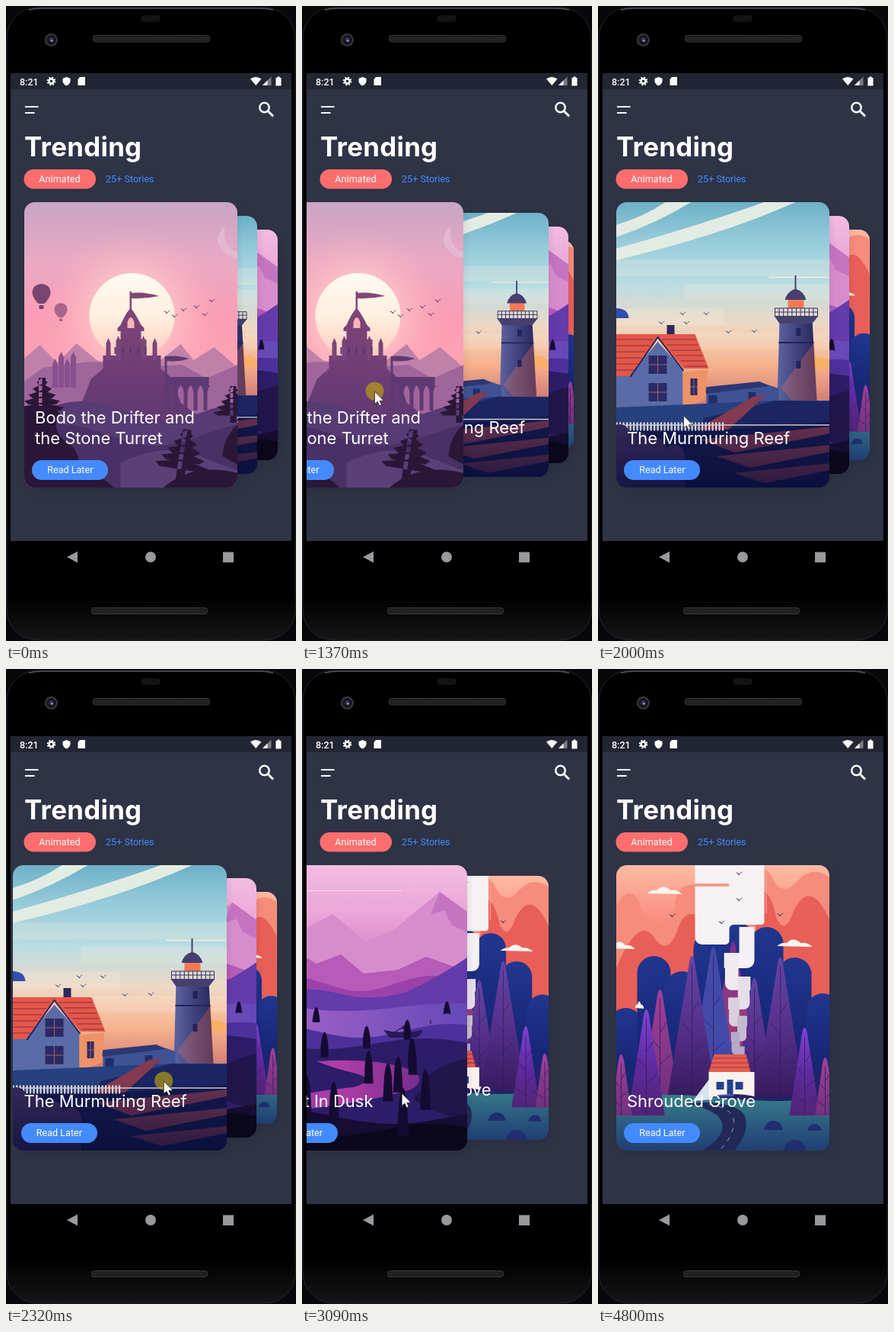
Animation of 381 by 832 pixels, one loop 5350 ms. Source, as an HTML page:

```html
<!DOCTYPE html>
<html lang="en">
<head>
<meta charset="utf-8">
<title>Trending stories</title>
<style>
html, body { margin: 0; width: 100%; height: 100%; overflow: hidden; background: #08080b; }
#stage { position: relative; width: 381px; height: 832px; overflow: hidden; }
#stage > svg { position: absolute; inset: 0; }
#deck { position: absolute; left: 6px; top: 88px; width: 369px; height: 613px; overflow: hidden; }
.card, .shade { position: absolute; overflow: hidden; border-radius: 14px; }
.shade { box-shadow: 3px 5px 9px rgba(0,0,0,.07); }
.card svg { display: block; width: 100%; height: 100%; }
.card p { position: absolute; left: 14.5px; bottom: 51.5px; margin: 0; color: #fff; white-space: pre; font: 22px/27px Inter, sans-serif; }
.card b { position: absolute; left: 10.8px; bottom: 10.5px; width: 100px; border-radius: 13px; background: #448aff; color: #fff; text-align: center; font: 12.6px/25.5px Roboto, sans-serif; }
</style>
</head>
<body>
<div id="stage">
  <svg width="381" height="832">
    <linearGradient id="chin" x2="0" y2="1"><stop offset=".93"/><stop offset="1" stop-color="#161618"/></linearGradient>
    <rect x="1" y="2" width="379" height="829" rx="40" fill="url(#chin)" stroke="#25262b"/>
    <path d="M30 5Q38 3 48 3H333Q343 3 351 5" fill="none" stroke="#55565a" stroke-width="1.5"/>
    <rect x="177" y="12" width="26" height="9" rx="4.5" fill="#131314"/>
    <g fill="#1d1d1f" stroke="#39393c">
      <rect x="114.5" y="38.5" width="153" height="8.5" rx="3"/>
      <rect x="112.5" y="788.5" width="152" height="8" rx="3"/>
    </g>
    <path d="M118 43H264M116 792.5H261" stroke="#2c2c2e" stroke-width="4" stroke-dasharray="1 1.5"/>
    <circle cx="59.5" cy="44.5" r="7.5" fill="#15151b" stroke="#3a3a3d" stroke-width="2"/>
    <circle cx="59.5" cy="44" r="3" fill="#30356a"/><circle cx="60.5" cy="45.5" r="1.2" fill="#a8acd0"/>
    <rect x="6" y="88" width="369" height="613" fill="#2e3346"/>
    <rect x="6" y="88" width="369" height="21" fill="#222633"/>
    <g fill="#fff" font-family="Roboto, sans-serif">
      <text x="18" y="103.5" font-size="12.5" font-weight="500">8:21</text>
      <circle cx="59.5" cy="98.5" r="3" fill="none" stroke="#fff" stroke-width="2.6"/>
      <circle cx="59.5" cy="98.5" r="4.8" fill="none" stroke="#fff" stroke-width="2" stroke-dasharray="2 1.77"/>
      <path d="M79.5 93l5 2v3.5q-.5 4-5 6-4.5-2-5-6V95zM97 93h7v11H94.5V96zM321 95.5q7-5 14.5 0L328.3 104zM354.5 94H356.5V92.5H359.5V94H361.5V104.5H354.5z"/>
      <path d="M337 104L348.5 92.5V104z" opacity=".4"/><path d="M337 104L343.5 97.5V104z"/>
      <path d="M25 132H42.5M25 140H37.5" stroke="#fff" stroke-width="2"/>
      <g fill="none" stroke="#fff" stroke-width="2.5"><circle cx="339.5" cy="133" r="6.2"/><path d="M344 137.5L351 144.5" stroke-width="3"/></g>
      <text x="24" y="197" font-family="Inter, sans-serif" font-size="34.8" font-weight="700" letter-spacing=".3">Trending</text>
      <rect x="23.5" y="214" width="94.5" height="25.5" rx="12.7" fill="#ff6e6e"/>
      <text x="70.5" y="231.3" font-size="12.7" text-anchor="middle">Animated</text>
      <text x="131" y="231.3" font-size="12.6" fill="#448aff">25+ Stories</text>
    </g>
    <path d="M80 722L94 714.5V729.5zM285 715.5H299V729H285zM197 722a7 7 0 1 1-14 0a7 7 0 1 1 14 0" fill="#98989d"/>
  </svg>
  <div id="deck"></div>
  <svg width="381" height="832">
    <g id="cursor">
      <circle id="press" cy="-.5" r="12" fill="#baa012" opacity=".68"/>
      <path d="M0 0V16.5L3.8 13.2 6.3 18.8 9 17.6 6.6 12.2H12z" fill="#fff" stroke="#222" stroke-width=".8"/>
    </g>
  </svg>
</div>
<script>
const range = (n, draw) => Array.from({ length: n }, (_, i) => draw(i)).join('');
const each = (list, draw) => list.map(item => draw(...item)).join('');
const path = (fill, d, more = '') => `<path fill="${fill}" d="${d}" ${more}/>`;
const line = (color, width, d, more = '') => path('none', d, `stroke="${color}" stroke-width="${width}" ${more}`);
const rect = (fill, x, y, w, h, more) => path(fill, `M${x} ${y}h${w}v${h}h${-w}z`, more);
const circle = (fill, x, y, r) => `<circle cx="${x}" cy="${y}" r="${r}" fill="${fill}"/>`;
const stops = colors => colors.map((c, i) => `<stop offset="${i / (colors.length - 1)}" stop-color="${c}"/>`).join('');
const gradient = (id, colors, dir = 'x2="0" y2="1"') => `<linearGradient id="${id}" ${dir}>${stops(colors)}</linearGradient>`;
const sky = (id, x, colors) => gradient(id, colors) + rect(`url(#${id})`, x, 257, 282, 375);
let seed = 7;
const random = () => (seed = seed * 16807 % 2147483647) / 2147483647;

const birds = (color, list) => each(list, (x, y) =>
  path(color, 'M-6-2Q-2-2 0 1Q3-3 6-3Q2-1 0 3Q-2 0-6-2', `transform="translate(${x} ${y}) scale(.8)"`));
const cloud = (fill, x, y, w) =>
  path(fill, `M${x} ${y}q${w * .12}-5 ${w * .27}-4q${w * .2}-9 ${w * .4} 0q${w * .2}-1 ${w * .33} 5z`);
const hill = (fill, x, y, amp, wave, phase) =>
  path(fill, `M${x} 632${range(48, i => `L${x + i * 6} ${y - amp * Math.sin(i * 6 / wave + phase)}`)}V632z`);
const dome = (fill, x, top, r) => path(fill, `M${x - r} 590V${top + r}a${r} ${r} 0 0 1 ${2 * r} 0V590z`);
const cone = (fill, x, top, base, half = (base - top) * .175) =>
  path(fill, `M${x} ${top}q3 0 5 18L${x + half} ${base}H${x - half}L${x - 5} ${top + 18}q2-18 5-18`);
const fir = (fill, x, top, base) => cone(fill, x, top, base) +
  line('#331b5c', .8, `M${x} ${top + 12}V${base}` + range(4, i =>
    `M${x} ${top + (base - top) * (.4 + i * .15)}l${(i % 2 ? -1 : 1) * (9 + 3 * i)}-13`));
const bush = (x, y, s, turn = 0) => {
  const side = dir => range(5, i => `M0 ${9 * i}L${dir * (8 + 6 * i)} ${9 * i + 7}l${-dir * 6} 5H0z`);
  return path('#2a1738', side(1) + side(-1) + 'M-5 0H5V60H-5z', `transform="translate(${x} ${y}) scale(${s}) rotate(${turn})"`);
};
const turret = (fill, x, top, w, base) =>
  path(fill, `M${x} ${top}l${w / 2} 7V${base}h${-w}V${top + 7}z`);

const castle = () => sky('dusk', 23, ['#c8a5c4', '#e9a9c4', '#fb9db6', '#fda4b3', '#d58cb0', '#8d5b91']) +
  `<radialGradient id="glow"><stop offset=".4" stop-color="#ffd3cd" stop-opacity=".7"/><stop offset="1" stop-color="#ffb0bb" stop-opacity="0"/></radialGradient>` +
  gradient('sun', ['#fffaf0', '#fff0df', '#ffc9bd']) + circle('url(#glow)', 165, 406, 115) + circle('url(#sun)', 165, 406, 56) +
  path('#e4b8d0', 'M287 288Q276 298 278 311Q284 328 305 330V323Q283 317 287 288') +
  each([[46, 376, 1, '#77456f'], [71.5, 398, .72, '#a9658a']], (x, y, s, c) =>
    path(c, 'M0-12Q12-11 12 0Q11 7 4 14H-4Q-11 7-12 0Q-12-11 0-12M-3 16H3V21H-3z', `transform="translate(${x} ${y}) scale(${s})"`)) +
  birds('#653663', [[270, 386], [250, 394], [261, 404], [233, 398], [221, 406], [211, 401]]) +
  path('#c081a9', 'M23 462L44 444 67 468 92 442 120 465 195 470 229 443 246 464 273 447 304 474V632H23z') +
  path('#a0659b', 'M23 492L48 474 110 466 201 472 231 470 263 488 304 470V632H23z') +
  range(4, i => turret('#8a508d', 64 + 8 * i, 462 - 9 * (i % 2), 7, 500)) +
  gradient('keep', ['#834878', '#693b74', '#50356f']) +
  path('url(#keep)', `M162 374H164.5V376Q180 374 201 380Q182 384 164.5 383V397Q170 404 177 418L181 422V426H177V437H184V458H203V475L219 490 229 520 270 550V632H55V560L95 530 111 489 127 475V458H145V437H150V426H146V422L150 418Q156 404 162 397z`) +
  each([[134, 435], [147, 432], [180, 432], [195, 435]], (x, top) => turret('#7b4578', x, top, 6, 464)) +
  path('#f7b3b7', 'M159 414q4.5-12 9 0v8h-9z') +
  range(5, i => rect('#5a356f', 142 + 10 * i, 447, 2, 9)) +
  path('#5f3a72', 'M208 459Q226 457 240 462Q225 467 211 465V481L215 486H266V497H214V530H208z') +
  range(4, i => path('#5f3a72', `M${216 + 13 * i} 497h13q-4 4-4 12v21h-5v-21q0-8-4-12`)) +
  hill('#573b74', 23, 530, 12, 35, -.6) + hill('#493065', 23, 562, 14, 40, .4) + hill('#5b4078', 150, 598, 16, 40, 0) +
  path('#2a1738', 'M23 525Q55 519 72 535Q57 551 75 568Q100 584 93 603Q126 615 142 632H23zM304 548Q285 565 284 590L304 601z') +
  bush(47, 487, .9) + bush(298, 498, .8) + bush(238, 555, 1.1, 9) + path('#2a1738', 'M205 632Q245 597 304 612V632z');

const pane = (x, y, w, h) => rect('#2b2a64', x, y, w, h) +
  line('#a0626f', 1, `M${x + w / 2} ${y}v${h}M${x} ${y + h / 2}h${w}`);
const lighthouse = () => sky('day', 9, ['#6fb1c8', '#98cddb', '#b9dde2', '#eed8c4', '#f6b28c', '#cf7572', '#29246c', '#12164d']) +
  path('#e3ece3', 'M9 287Q46 276 74 257H108Q62 285 9 303zM9 318Q120 287 204 257H245Q150 300 9 333z') +
  range(4, i => rect('#fdeedd', 9 + 90 * (i % 2), 332 + 32 * i, 282 - 70 * (i % 3), 22, 'opacity=".2"')) +
  line('#f9e9dd', 1.3, 'M210 355.5H290') + path('#304fae', 'M9 396Q25 396 26 409H9z') +
  birds('#35517f', [[97, 403], [128, 403], [69, 415], [102, 415], [157, 427], [191, 426]]) +
  path('#f9b068', 'M249 475Q251 462 268 460Q284 458 291 468V476z') +
  gradient('tower', ['#5c64a0', '#42427d', '#26265d'], 'x2="1"') + path('url(#tower)', 'M224 411H267L273 517H221z') +
  path('#ee6f55', 'M226 500L270 440 273 517H240z', 'opacity=".3"') +
  rect('#f47a55', 235, 384, 21, 12) + path('#45406f', 'M244 353H246V371Q256 374 259 385H231Q234 374 244 371zM217 406H275L267 416H224z') +
  line('#363369', 1, 'M218 396H274M218 401H274' + range(11, i => `M${218 + 5.6 * i} 396v11`)) +
  range(2, i => rect('#22245a', 246, 422 + 43 * i, 6, 10)) + rect('#22245a', 223, 440, 46, 2) +
  path('#3f5293', 'M128 504L202 494 223 501V525L128 534z') + path('#2b3873', 'M120 500L198 492 210 498 128 508z') +
  rect('#222d69', 131, 510, 11, 17) + rect('#222d69', 183, 506, 10, 13) +
  rect('#2a2961', 76, 418, 10, 22) + path('#e55747', 'M9 430H113L131 475H98L64 434 28 486H9z') +
  line('#7c2f4b', 1, range(6, i => `M9 ${437 + 8 * i}H${58 - 5 * i}M${70 + 6 * i} ${437 + 7 * i}H${114 + 3 * i}`)) +
  path('#5a6ca8', 'M64 440L97 476V526H9V485H26z') + path('#ee9368', 'M97 480L130 476 126 516 97 527z') +
  line('#28265c', 2, 'M28 486L64 434 98 478') + range(2, i => pane(52, 458 + 36 * i, 24, 24)) + pane(107, 488, 9, 22) +
  path('#27407f', 'M9 526L220 517H291V632H9z') + path('#1b2561', 'M125 540L219 517 291 518V632H80z') +
  path('#843a50', 'M82 574L189 512 206 510 160 552 91 604z') + path('#12194b', 'M9 555H154L291 545V632H9z') +
  range(3, i => path('#6c3350', `M${120 + 22 * i} ${568 + 22 * i}L291 ${551 + 24 * i}v9L${165 + 20 * i} ${585 + 20 * i}z`)) +
  line('#eee7e7', 11, 'M9 551H151', 'stroke-dasharray="2.2 2.3"') + line('#ded8de', 1.5, 'M9 549H291') +
  range(4, i => dome('#372a59', 14 + 24 * i, 548 + 9 * i, 13) + rect('#372a59', 9, 588, 90, 44)) +
  gradient('night', ['#0a0c3800', '#0a0c38b0']) + rect('url(#night)', 9, 540, 282, 92);

const valley = () => sky('lilac', -63, ['#f3bce2', '#eaa6d8', '#d683ca', '#b95fbd', '#613da7', '#31225f', '#130b28']) +
  line('#f8d7ed', 1, 'M-10 290.5H133') +
  path('#d78dcc', 'M-63 363L-28 334 -6 347 42 321 86 357 122 342 183 292 219 318V455H-63z') +
  path('#c574c2', 'M183 292L171 322 189 316 198 335 219 345V318z') +
  path('#b55bb8', 'M-63 385L-20 362 21 386 53 374 83 399 128 394 165 377 219 396V470H-63z') +
  hill('#9b42aa', -63, 412, 10, 30, 0) + path('#633bab', 'M219 378Q180 405 139 423Q95 437 50 425Q-5 410-63 435V510H219z') +
  gradient('lake', ['#ac67cb', '#6548b7'], 'x2="1"') + hill('url(#lake)', -63, 443, 5, 45, 2) +
  hill('#4d319b', -63, 474, 9, 38, 1) + hill('#2d1d68', -63, 491, 7, 42, 2.5) +
  gradient('river', ['#653db4', '#b23da7', '#782d8d'], 'x2="1"') +
  path('url(#river)', 'M21 514Q95 509 138 523Q171 536 145 551Q96 566 5 577L-63 592V574Q-5 555 69 548Q105 538 69 529Q47 524 21 514') +
  path('#20164b', 'M219 510Q159 523 163 551Q120 567 219 592z') +
  hill('#160d32', -63, 586, 10, 50, 1) + hill('#0b071c', -63, 604, 8, 40, 2) +
  path('#281953', 'M109 473Q133 479 161 473Q157 483 148 483H117zM133 472L136 466 139 472z') +
  line('#281953', 1.3, 'M123 476L135 469 145 476M171 460v5') +
  range(16, i => {
    const near = i / 15, base = 440 + 172 * near;
    return cone('#150b32', -58 + 272 * random(), base - 13 - 50 * near, base, 3 + 5 * near);
  });

const serpent = range(6, i => {
  const x = k => 184 + 11 * (-.8) ** k, y = k => 348 + 34 * (1 - .88 ** k) / .12;
  return line(['#f4f0f3', '#f0ebf0', '#e6dfe9', '#d8d0df', '#c6bcd2', '#b3a9c8'][i], 20 * .88 ** i,
    `M${x(i)} ${y(i)}V${y(i + 1)}H${x(i + 1)}`, 'stroke-linejoin="round" stroke-linecap="square"');
});
const forest = () => sky('coral', 23, ['#ffbaa2', '#f89483', '#f0776e', '#dd5d67', '#6e346d', '#253b7b', '#1c3169']) +
  path('#f68c7b', 'M23 311Q42 279 54 307Q62 337 81 334Q101 331 101 304Q107 273 145 287V450H23zM201 257Q222 257 229 275Q242 300 261 278Q281 256 304 273V450H201z') +
  path('#e95f58', 'M23 393Q53 320 74 353Q91 377 104 342Q114 307 142 330V450H23zM207 450V288Q226 286 234 326Q245 350 256 318Q278 272 304 329V450z') +
  gradient('grove', ['#22368f', '#172778', '#27205f']) +
  [444, 376, 396, 344, 333, 338, 378, 425].map((top, i) => dome('url(#grove)', 36 + 37 * i, top, 22)).join('') +
  gradient('pink', ['#75348c', '#b54073']) + cone('url(#pink)', 177, 357, 548, 38) +
  gradient('violet', ['#6544a4', '#56308b', '#371b5f']) +
  gradient('plum', ['#a14099', '#71307d']) + gradient('iris', ['#8042d5', '#5e2ba0', '#502475']) +
  each([['#424aa9', 151, 364], ['url(#plum)', 81, 420], ['url(#violet)', 205, 405], ['url(#violet)', 123, 376], ['url(#violet)', 239, 378]],
    (fill, x, top) => fir(fill, x, top, 560)) +
  serpent + path('#f6f2f3', 'M127 257H218V331Q218 335 213 335H178Q172 335 172 341V355Q172 361 166 361H136Q127 360 127 351z') +
  line('#f59a87', 4, 'M127 283H170', 'stroke-linecap="round"') + line('#f4b2a8', 1, 'M220.5 263V320') +
  each([[64, 294, 46], [235, 363, 46], [10, 366, 38], [48, 444, 12]], (x, y, w) => cloud('#fff4f0', x, y, w)) +
  birds('#36275d', [[185, 268], [185, 302], [97, 323], [162, 332], [239, 322]]) +
  gradient('ground', ['#377e89', '#2c5c80', '#1f3e73']) + hill('url(#ground)', 23, 562, 4, 45, 0) +
  path('#d7e4ed', 'M124 566L146 537 150 564z') + path('#f8f1ee', 'M145 528H205V560Q180 554 145 560z') +
  path('#e65c4c', 'M152 505H194L200 528H145z') + line('#943853', 1.2, range(3, i => `M${151 - 2 * i} ${510 + 6 * i}H${195 + 2 * i}`)) +
  range(2, i => rect('#21428c', 155 + 25 * i, 541, 10, 10)) + rect('#21428c', 169, 538, 8, 19) +
  path('#222958', 'M141 568Q194 570 194 593Q196 610 178 632H135Q168 613 162 594Q157 577 113 569z') +
  line('#8ba7bc', 1, 'M145 570Q179 576 178 594Q177 615 157 632', 'stroke-dasharray="6 7"') +
  each([['url(#iris)', 63, 446], ['url(#plum)', 30, 505], ['url(#iris)', 271, 470], ['url(#plum)', 298, 509]],
    (fill, x, top) => fir(fill, x, top, 585)) +
  each([[230, 604, 12], [258, 631, 14], [284, 605, 9]], (x, y, r) => path('#202d70', `M${x - r} ${y}a${r} ${r} 0 0 1 ${2 * r} 0z`));

const stories = [
  [castle, 23.5, 'Bodo the Drifter and\nthe Stone Turret'],
  [lighthouse, 9.5, 'The Murmuring Reef'],
  [valley, -62, 'Violet In Dusk'],
  [forest, 23.5, 'Shrouded Grove'],
];
const deck = document.getElementById('deck');
const cards = stories.map(([art, x, title]) => {
  deck.insertAdjacentHTML('afterbegin', `<div class="shade"></div><div class="card">
    <svg viewBox="${x} 257 280.5 374" preserveAspectRatio="none">${art()}</svg><p>${title}</p><b>Read Later</b></div>`);
  return [deck.children[0], deck.children[1]];
});

const LOOP = 5350;
// Each swipe: start, duration, time the finger stays down
const swipes = [[1121, 798, 400], [2252, 600, 300], [2878, 700, 180], [3720, 0, 40]];
// Cursor stops: time, x, y
const moves = [[0, 260, 850], [280, 190, 413], [530, 150, 516], [1121, 205, 514], [1370, 96, 505], [1600, -20, 510],
  [1700, -20, 535], [2250, 222, 538], [2320, 208, 540], [2520, 55, 549], [2878, 211, 553], [3090, 131, 556],
  [3600, 219, 528], [3720, 219, 528], [4140, 292, 313], [4490, 322, 724], [4800, 327, 840]];

const ease = u => { u = Math.min(Math.max(u, 0), 1); return u * u * (3 - 2 * u); };
const pageAt = t => swipes.slice(0, 3).reduce((page, [start, length]) => page + ease((t - start) / length), 0);
function cursorAt(t) {
  const i = moves.findIndex(move => move[0] > t);
  if (i < 0) return moves[moves.length - 1].slice(1);
  const a = moves[i - 1], b = moves[i], u = (t - a[0]) / (b[0] - a[0]);
  return [1, 2].map(k => a[k] + (b[k] - a[k]) * u);
}

const cursor = document.getElementById('cursor'), press = document.getElementById('press');
const begin = performance.now();
function draw() {
  const t = (performance.now() - begin) % LOOP, page = pageAt(t);
  cards.forEach((layers, i) => {
    const delta = i - page, inset = 18 * Math.max(delta, 0), height = 374 - 2 * inset;
    const right = 18 + Math.max(53 - 26.3 * delta * (delta < 0 ? 15 : 1), 0);
    for (const { style } of layers) {
      style.top = 169 + inset + 'px';
      style.right = right + 'px';
      style.height = height + 'px';
      style.width = height * .75 + 'px';
    }
  });
  cursor.setAttribute('transform', `translate(${cursorAt(t)})`);
  press.style.display = swipes.some(([start, , hold]) => t > start - 120 && t < start + hold) ? '' : 'none';
  requestAnimationFrame(draw);
}
draw();
</script>
</body>
</html>
```
